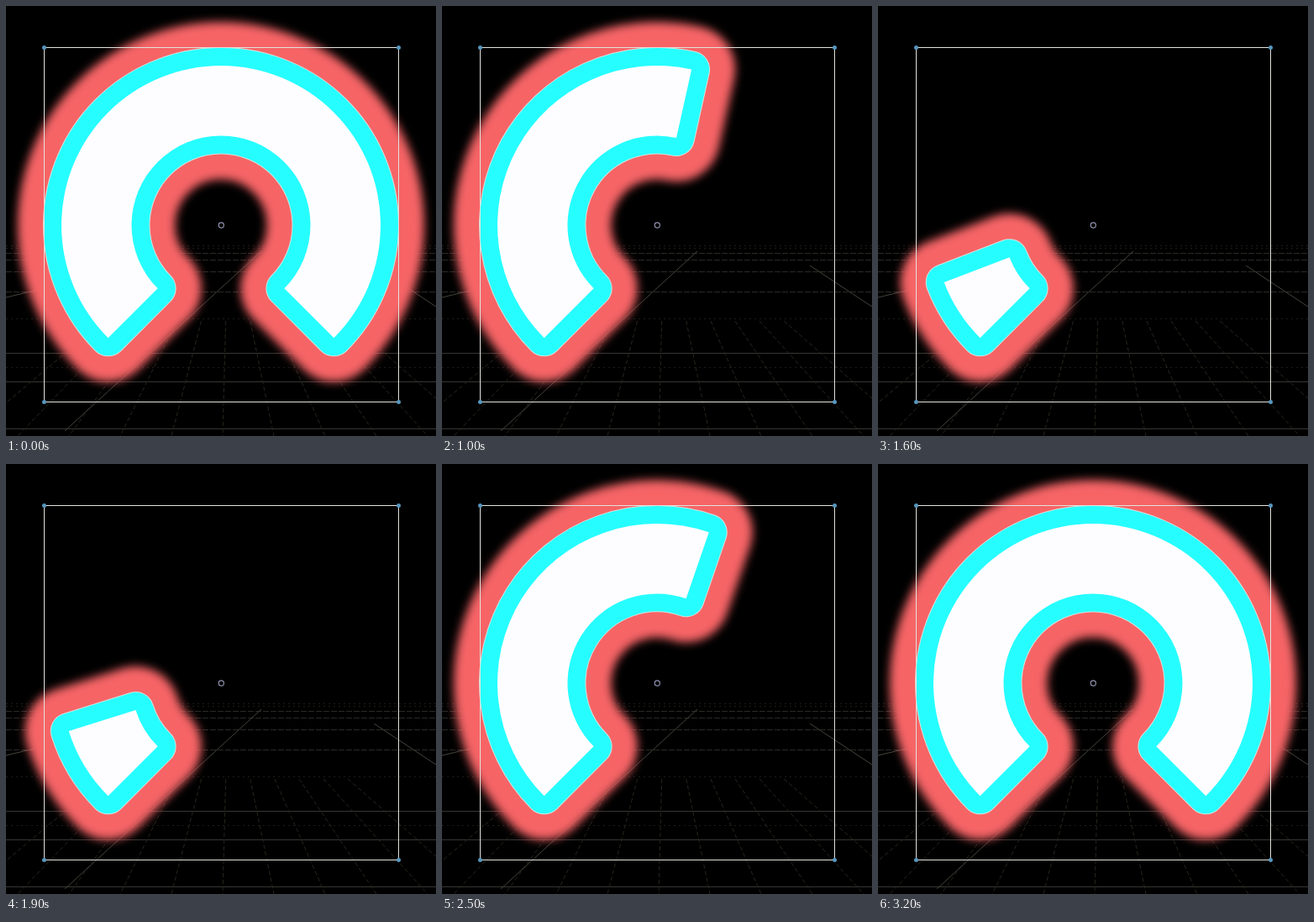
An HTML page for the animation above (3300 ms loop, 512 by 512 pixels).

```html
<!DOCTYPE html>
<html>
<head>
<meta charset="utf-8">
<style>
  html, body { margin: 0; width: 100%; height: 100%; overflow: hidden; background: #000; }
  svg { display: block; width: 100vw; height: 100vh; }
</style>
</head>
<body>
<svg viewBox="0 0 512 512">
  <defs>
    <filter id="soft" filterUnits="userSpaceOnUse" x="-40" y="-40" width="592" height="592" color-interpolation-filters="sRGB">
      <feGaussianBlur stdDeviation="5.2"/>
    </filter>
  </defs>
  <rect width="512" height="512"/>
  <g id="floor" fill="none" stroke-width="1"></g>
  <g stroke-linejoin="round">
    <path class="arc" fill="#f66466" stroke="#f66466" stroke-width="104" filter="url(#soft)"/>
    <path class="arc" fill="none" stroke="#d4e2dc" stroke-width="44"/>
    <path class="arc" fill="none" stroke="#26fdff" stroke-width="42"/>
    <path class="arc" fill="#fdfdff"/>
  </g>
  <rect x="45.5" y="49.5" width="422" height="422" fill="none" stroke="#e2e2dc" stroke-width="1"/>
  <g id="handles" fill="#5796bd"></g>
  <circle cx="256.3" cy="261" r="3.1" fill="#000" stroke="#9496b4" stroke-width="1.1"/>
</svg>
<script>
const CX = 256, CY = 261, OUTER = 190, INNER = 106.5;
const LOOP = 3300, STEP = 100, LEAD = 2;
const START = -135, FULL = 270, LEAST = 0.07;
// step number, phase of the cosine swing in degrees
const PHASES = [[0, 0], [3, 34.1], [8, 88.6], [14, 163.6], [20, 239.2], [25, 297.8], [30, 360]];

const rad = deg => deg * Math.PI / 180;
const arcs = document.querySelectorAll('.arc');

function add(parent, tag, attrs) {
  const node = document.createElementNS('http://www.w3.org/2000/svg', tag);
  for (const key in attrs) node.setAttribute(key, attrs[key]);
  document.getElementById(parent).append(node);
}

function line(x1, y1, x2, y2, stroke, dash = 'none') {
  add('floor', 'line', { x1, y1, x2, y2, stroke, 'stroke-dasharray': dash });
}

function buildFloor() {
  for (const y of [285.5, 288.5]) line(0, y, 512, y, '#1e1e18', '2 4');
  for (const y of [294.5, 302.5, 316.5, 340.5]) line(0, y, 512, y, '#2a2a26', '7 2');
  for (const y of [372.5, 430.5]) line(0, y, 512, y, '#1c1c18', '2 4');
  for (const y of [413.5, 447.5, 503.5]) line(0, y, 512, y, '#363634');
  for (let i = -5; i <= 5; i++) {
    const x = 258 + i * 61, top = (375 - 250) / (512 - 250);
    line(265 + (x - 265) * top, 375, x, 512, '#26261e', '5 3');
  }
  line(304, 292, 70, 506, '#44443c');
  line(438, 309, 512, 358, '#44443c');
  line(0, 347, 50, 335, '#44443c');
}

function point(radius, deg) {
  const x = CX + radius * Math.sin(rad(deg));
  const y = CY - radius * Math.cos(rad(deg));
  return x.toFixed(2) + ' ' + y.toFixed(2);
}

function sector(sweep) {
  const end = START + sweep, large = sweep > 180 ? 1 : 0;
  return `M${point(OUTER, START)}A${OUTER} ${OUTER} 0 ${large} 1 ${point(OUTER, end)}` +
    `L${point(INNER, end)}A${INNER} ${INNER} 0 ${large} 0 ${point(INNER, START)}Z`;
}

function sweepAt(step) {
  const i = Math.max(1, PHASES.findIndex(([s]) => s >= step));
  const [s0, p0] = PHASES[i - 1], [s1, p1] = PHASES[i];
  const phase = p0 + (p1 - p0) * (step - s0) / (s1 - s0);
  return FULL * (LEAST + (1 - LEAST) * (1 + Math.cos(rad(phase))) / 2);
}

function draw(time) {
  const step = Math.max(0, Math.floor(time % LOOP / STEP) - LEAD);
  const d = sector(sweepAt(step));
  arcs.forEach(arc => arc.setAttribute('d', d));
}

buildFloor();
for (const cx of [45.5, 467.5])
  for (const cy of [49.5, 471.5]) add('handles', 'circle', { cx, cy, r: 2.5 });

const begin = performance.now();
function tick() {
  draw(performance.now() - begin);
  requestAnimationFrame(tick);
}
tick();
</script>
</body>
</html>
```
